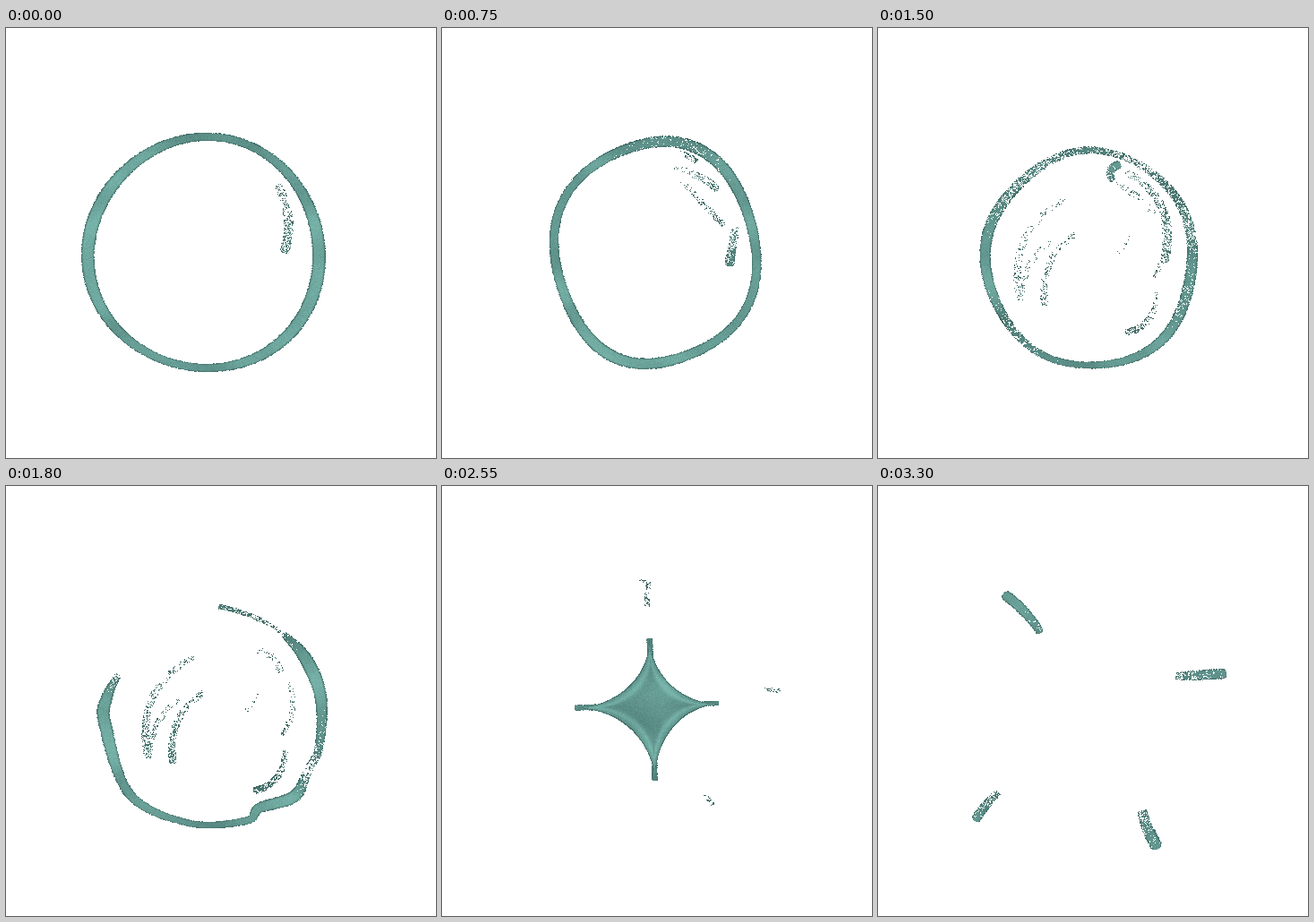
An HTML page with a canvas for the animation above (3450 ms loop, 480 by 480 pixels).

```html
<!DOCTYPE html>
<html lang="en">
<head>
<meta charset="utf-8">
<title>Bubble pop</title>
<style>
html, body { margin: 0; width: 100%; height: 100%; overflow: hidden; background: #fff; }
canvas { display: block; width: 480px; height: 480px; }
</style>
</head>
<body>
<canvas id="stage" width="480" height="480"></canvas>
<script>
const SIZE = 480, HOLD = 150, CX = 238, CY = 247, RAD = Math.PI / 180;
const ctx = document.getElementById('stage').getContext('2d');
let ink;

const lerp = (a, b, t) => a + (b - a) * t;
const hash = (x, y, s = 0) => {
  let h = Math.imul(x, 374761393) + Math.imul(y, 668265263) + Math.imul(s, 974711);
  h = Math.imul(h ^ (h >>> 13), 1274126177);
  return ((h ^ (h >>> 16)) >>> 0) / 4294967296;
};
const grain = (x, y) => 0.55 * hash(x, y) + 0.45 * hash(x >> 1, y >> 1, 7);
const spline = (a, b, c, d, t) =>
  b + 0.5 * t * (c - a + t * (2 * a - 5 * b + 4 * c - d + t * (3 * (b - c) + d - a)));

// Points are [x, y, width, density]; density below 1 gives a dry brush.
function stroke(pts, { closed = false, k = 1, erase = false } = {}) {
  const n = pts.length, last = closed ? n : n - 1;
  const at = i => pts[closed ? (i + n) % n : Math.max(0, Math.min(n - 1, i))];
  for (let i = 0; i < last; i++) {
    const [a, b, c, d] = [at(i - 1), at(i), at(i + 1), at(i + 2)];
    const len = Math.hypot(c[0] - b[0], c[1] - b[1]);
    const steps = Math.ceil(len * 2.5) + 1;
    const pos = (t, j) => spline(a[j], b[j], c[j], d[j], t);
    for (let s = 0; s <= steps; s++) {
      const t = s / steps, x = pos(t, 0), y = pos(t, 1);
      const dx = pos(t + 0.01, 0) - pos(t - 0.01, 0), dy = pos(t + 0.01, 1) - pos(t - 0.01, 1);
      const m = Math.hypot(dx, dy) || 1;
      const den = lerp(b[3] ?? 1, c[3] ?? 1, t) * k;
      let half = Math.max(0.6, pos(t, 2) / 2);
      const cap = Math.min(1, 0.3 + half * 0.11);
      if (!closed) {
        const end = Math.min(i === 0 ? t * len : 99, i === last - 1 ? (1 - t) * len : 99) + 0.6;
        if (end < half) half = Math.sqrt(2 * half * end - end * end);
      }
      for (let o = -half; o <= half; o += 0.4) {
        const px = Math.round(x - dy / m * o), py = Math.round(y + dx / m * o);
        if (px < 0 || py < 0 || px >= SIZE || py >= SIZE) continue;
        const edge = half - Math.abs(o), q = py * SIZE + px;
        if (edge + 0.5 < hash(px, py, 3)) continue;
        if (den < 1 && grain(px, py) > den) continue;
        const tone = Math.min(cap, 0.3 + edge / 3.5) * (0.1 + 0.9 * Math.min(1, den));
        ink[q] = erase ? 0 : Math.max(ink[q], 0.02 + tone);
      }
    }
  }
}

const scaled = (pts, s, dx = 0, dy = 0) => pts.map(([x, y, w, d]) =>
  [CX + (x - CX) * s + dx, CY + (y - CY) * s + dy, w * s, d]);

// A mark runs [x0, y0, x1, y1, width, density, bend], drier where it starts.
// taper is the width left at its start.
function marks(list, { k = 1, scale = 1, taper = 0.75, erase = false } = {}) {
  for (const [x0, y0, x1, y1, w, den = 1.7, bend = 0] of list) {
    const len = Math.hypot(x1 - x0, y1 - y0);
    const pts = Array.from({ length: 6 }, (_, i) => {
      const t = i / 5, off = bend * 4 * t * (1 - t) / len;
      const wide = lerp(taper, 1, Math.sin(Math.min(1, t * 1.25) * Math.PI / 2));
      return [lerp(x0, x1, t) - (y1 - y0) * off, lerp(y0, y1, t) + (x1 - x0) * off,
        w * wide, den * lerp(0.6, 1.1, t)];
    });
    stroke(scaled(pts, scale), { k, erase });
  }
}

// Bubble outlines: outer box, wobble [harmonic, amount, peak angle],
// width [mean, swing, widest angle], dry spots [angle, spread, lowest density].
const round = { box: [86, 117, 356, 385], wobble: [[3, 0.012, 45]], width: [11.5, 3, 12], dry: [] };
const tall = { box: [119, 125, 357, 383], wobble: [[1, 0.03, 270], [4, 0.025, 115]],
  width: [11, 1.5, 120], dry: [[280, 40, 0.75]] };
const wide = { box: [99, 131, 362, 378], wobble: [[1, 0.025, 270], [3, 0.02, 55]],
  width: [9.5, 3, 30], dry: [[340, 24, 0], [136, 26, 0.2], [302, 34, 0.5]] };
const torn = { box: [102, 131, 358, 381], wobble: [[5, 0.025, 48]],
  width: [9.5, 3, 0], dry: [[235, 50, 0.1], [20, 22, 0.4], [295, 30, 0.4]] };

function outline({ wobble, width, dry }, [l, t, r, b]) {
  return Array.from({ length: 32 }, (_, i) => {
    const deg = i * 11.25, wave = (h, p) => Math.cos(h * (deg - p) * RAD);
    const w = width[0] + width[1] * wave(2, width[2]);
    const f = wobble.reduce((sum, [h, amp, p]) => sum + amp * wave(h, p), 1);
    const den = dry.reduce((min, [a, spread, lo]) => {
      const gap = Math.abs((deg - a + 540) % 360 - 180) / spread;
      return Math.min(min, lerp(lo, 1, Math.min(1, gap * gap)));
    }, 1);
    return [(l + r) / 2 + ((r - l) / 2 - 6) * f * Math.cos(deg * RAD),
      (t + b) / 2 + ((b - t) / 2 - 5) * f * Math.sin(deg * RAD), w, den];
  });
}

function ring(from, to = from, t = 0, box = from.box) {
  const a = outline(from, box), b = outline(to, box);
  stroke(a.map((p, i) => p.map((v, j) => lerp(v, b[i][j], t))), { closed: true });
}

const glint = [[303, 175, 310, 250, 10, 0.5, -8]];
const dryGlint = [[259, 156, 307, 180, 8, 0.42, -4], [267, 170, 314, 220, 6, 0.42], [327, 222, 320, 265, 10, 0.65]];
const wetGlint = [[262, 170, 270, 152, 9, 1.7, -7], [265, 172, 291, 189, 6, 0.65], [277, 160, 319, 261, 9, 0.95, -21]];
const inner = [
  [218, 186, 158, 303, 8, 0.42, 26], [220, 230, 186, 309, 8, 0.5, 14], [194, 236, 159, 298, 6, 0.4, 8],
  [276, 183, 306, 207, 7, 0.3, -7], [316, 219, 308, 277, 6, 0.38, -7], [281, 232, 268, 251, 5, 0.28],
  [311, 295, 276, 340, 7, 0.6, -11]
];
const shell = [
  [309, 164, 6, 0.6], [335, 194, 14], [351, 237, 13], [349, 290, 9, 0.7], [337, 316, 9, 0.3],
  [321, 346, 13], [282, 359, 11], [268, 373, 8], [205, 376, 7], [138, 344, 10],
  [110, 265, 14], [112, 236, 12], [125, 210, 6, 0.4]
];
const chip = [[306, 162, 237, 134, 5, 0.65, 4]];
const rays = [[257, 162, 250, 75, 42], [179, 243, 67, 256, 29], [339, 240, 455, 242, 27], [245, 310, 238, 430, 33]];
const drops = [
  [218, 134, 193, 88, 12, 0.5], [221, 200, 179, 177, 11], [157, 187, 113, 171, 13, 1.7, -3],
  [315, 159, 348, 131, 13], [322, 185, 376, 162, 14, 1], [327, 279, 364, 289, 15],
  [319, 345, 362, 365, 18], [167, 341, 118, 373, 19], [180, 359, 169, 401, 15], [86, 380, 52, 408, 14, 1]
];
const spray = [[252, 84, 250, 45, 17, 0.6], [142, 245, 91, 250, 14, 0.7], [368, 232, 433, 229, 14, 0.7], [246, 420, 239, 478, 16, 0.6]];
const flecks = [[181, 163, 140, 120, 11, 1.1, 3], [332, 212, 388, 209, 11, 0.8], [134, 342, 108, 373, 10, 0.75, 2], [294, 361, 312, 404, 13, 0.8, 2]];
const specks = [[217, 103, 230, 108, 4, 0.4], [230, 107, 228, 134, 6, 0.45], [359, 226, 377, 228, 4, 0.45], [293, 343, 302, 355, 5, 0.5]];
const tips = [[236, 245, 231, 170, 6], [236, 245, 237, 328, 6], [234, 245, 148, 247, 6], [234, 245, 308, 242, 5]];

function rim(k = 1, scale = 1, dx = 0, dy = 0) {
  stroke(scaled(shell, scale, dx, dy), { k });
  marks(chip, { k, scale });
}

// Concave four-pointed star with a pale ridge just inside its edge.
function star(k = 1, scale = 1) {
  marks(tips, { k, scale, taper: 1 });
  for (let y = -90; y < 90; y++) for (let x = -90; x < 80; x++) {
    const u = Math.abs(x - y * 0.04) / (x < 0 ? 86 : 76), v = Math.abs(y + x * 0.03) / (y < 0 ? 76 : 84);
    const e = 1 - u ** 0.57 - v ** 0.57;
    const px = Math.round(CX + (x - 4) * scale), py = Math.round(CY + (y - 2) * scale);
    if (e < 0 || grain(px, py) > k) continue;
    const ridge = Math.exp(-(((e - 0.13) / 0.07) ** 2));
    ink[py * SIZE + px] = e < 0.025 ? 0.45 : 0.78 + 0.35 * ridge;
  }
}

function burst(scale, dropScale) {
  marks(rays, { scale, taper: 0.12 });
  marks(drops, { scale: dropScale, taper: 0.4 });
}

const scenes = [
  () => { ring(round); marks(glint); },
  () => { ring(round); marks(dryGlint); },
  () => { ring(round); marks(dryGlint); marks([[282, 162, 288, 184, 6, 0.4]]); },
  () => { ring(round, tall, 0.2, [87, 118, 356, 384]); marks(dryGlint); },
  () => { ring(round, tall, 0.6, [109, 116, 370, 387]); marks(dryGlint); },
  () => { ring(tall); marks(dryGlint); marks([[266, 138, 284, 148, 6, 0.5]]); },
  () => { ring(tall, wide, 0.4, [97, 136, 359, 385]); marks(dryGlint, { k: 1.2 }); },
  () => { ring(tall, wide, 0.7, [100, 136, 365, 390]); marks(wetGlint, { k: 0.8 }); },
  () => { ring(wide); marks(wetGlint); },
  () => { ring(wide, wide, 0, [91, 130, 363, 384]); marks(wetGlint, { k: 0.85 }); },
  () => { ring(wide, torn, 0.5, [115, 134, 358, 384]); marks(wetGlint, { k: 0.5 }); marks(inner, { k: 0.7 }); },
  () => { ring(torn, torn, 0, [114, 136, 358, 381]); marks(inner, { k: 0.9 }); },
  () => { rim(); marks(inner); },
  () => { rim(0.65, 1.03, 4); marks(inner, { k: 1.4, scale: 0.88 }); },
  () => { rim(0.4, 1.1, 9, 25); marks(inner, { k: 1.7, scale: 0.72 }); },
  () => { rim(0.28, 1.12, 0, 3); star(0.65, 0.6); },
  () => { rim(0.2, 1.05, 4, -6); star(1, 0.85); },
  () => { star(); marks(specks); },
  () => burst(0.96, 0.62),
  () => burst(0.985, 0.85),
  () => { burst(1, 1); marks([[257, 142, 255, 85, 4, 0.9, 2]], { erase: true }); },
  () => { marks(spray); marks(flecks, { scale: 0.96 }); },
  () => marks(flecks)
];

const dark = [54, 92, 88], light = [114, 172, 163];
const frames = scenes.map(draw => {
  ink = new Float32Array(SIZE * SIZE);
  draw();
  const img = ctx.createImageData(SIZE, SIZE), px = img.data.fill(255);
  ink.forEach((v, i) => {
    if (!v) return;
    const x = i % SIZE, y = i / SIZE | 0;
    const wash = 0.07 * Math.sin(x / 13 + Math.sin(y / 17) * 2) + 0.07 * Math.sin(y / 11);
    const t = Math.max(0, Math.min(1.1, v - 0.08 + wash + 0.2 * (hash(x, y, 5) - 0.5)));
    for (let c = 0; c < 3; c++) px[i * 4 + c] = lerp(dark[c], light[c], t);
  });
  return img;
});

let shown = -1;
function tick() {
  const i = Math.floor(performance.now() / HOLD) % frames.length;
  if (i !== shown) ctx.putImageData(frames[shown = i], 0, 0);
  requestAnimationFrame(tick);
}
tick();
</script>
</body>
</html>
```
